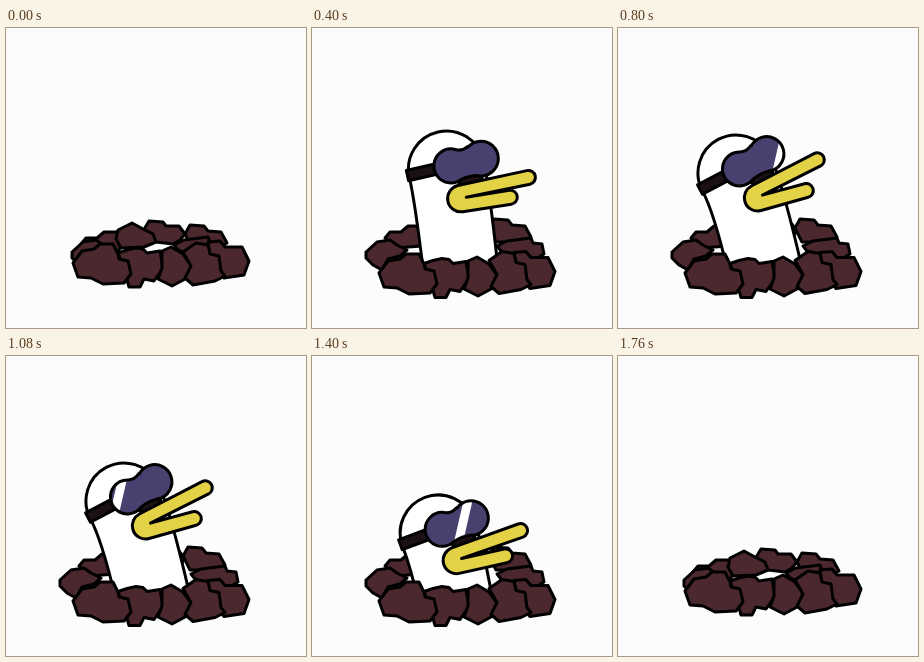
An HTML page with a canvas for the animation above (1.8 s loop, 300 by 300 pixels).

```html
<!DOCTYPE html>
<html lang="en">
<head>
<meta charset="utf-8">
<title>Bird in a burrow</title>
<style>
html, body { margin: 0; width: 100%; height: 100%; overflow: hidden; background: #fcfcfc; }
canvas { display: block; width: 300px; height: 300px; }
</style>
</head>
<body>
<canvas id="stage" width="300" height="300"></canvas>
<script>
const ctx = document.getElementById('stage').getContext('2d');
const LOOP = 1800, STEP = 40;
const ROCK = '#4b272e', LENS = '#4a4070', BEAK = '#e3d245', DARK = '#1b1014';

// Each rock: how far it is pushed outwards, then its outline when settled.
const backRocks = [
  { push: [0, -3], pts: [137,203, 143,193, 157,194, 160,198, 173,198, 179,206, 174,212, 167,216, 150,214] },
  { push: [-2, -6], pts: [179,206, 184,197, 198,198, 202,203, 215,204, 221,215, 212,220, 186,220] },
  { push: [17, 1], pts: [168,217, 178,212, 202,209, 204,214, 213,215, 215,225, 200,234, 172,222] },
  { push: [-2, -6], pts: [75,216, 80,210, 91,210, 98,204, 112,204, 117,214, 112,224, 85,226] },
  { push: [-2, -6], pts: [112,202, 126,195, 137,201, 147,206, 150,214, 138,219, 115,220, 110,211] },
  { push: [-12, 0], pts: [66,224, 77,214, 90,212, 97,217, 107,222, 100,228, 88,231, 82,242, 73,237, 66,230] }
];
const frontRocks = [
  { push: [0, 10.5], pts: [202,214, 214,213, 219,219, 236,219, 243,233, 238,247, 218,250, 205,235] },
  { push: [0, 10.5], pts: [112,225, 121,222, 130,220, 137,221, 141,225, 154,223, 157,240, 148,253, 138,251, 134,259, 123,259, 119,245] },
  { push: [0, 10], pts: [156,223, 165,219, 177,226, 185,237, 181,250, 166,258, 152,251, 156,240] },
  { push: [0, 8.5], pts: [177,224, 190,215, 202,217, 204,226, 213,228, 215,243, 219,248, 209,253, 187,257, 179,250, 185,238] },
  { push: [0, 10], pts: [76,223, 88,221, 94,216, 107,216, 112,226, 113,231, 122,233, 125,246, 118,255, 97,256, 85,250, 72,249, 67,235] }
];

const clamp = v => Math.max(0, Math.min(1, v));
const span = (t, a, b) => clamp((t - a) / (b - a));
const easeOut = v => 1 - (1 - v) * (1 - v);
const rad = d => d * Math.PI / 180;

function paint(fill) {
  ctx.fillStyle = fill;
  ctx.fill();
  ctx.stroke();
}

function drawRock({ push, pts }, spread) {
  ctx.beginPath();
  for (let i = 0; i < pts.length; i += 2) {
    ctx.lineTo(pts[i] + push[0] * spread, pts[i + 1] + push[1] * spread);
  }
  ctx.closePath();
  paint(ROCK);
}

function poseAt(t) {
  const rise = easeOut(span(t, 40, 360));
  const tilt = easeOut(span(t, 400, 760));
  const fall = span(t, 1120, 1660);
  const sink = fall * fall;
  const lean = (0.46 * span(t, 0, 400) + 0.54 * tilt) * (1 - sink);
  return {
    x: 148.5 - 30.5 * lean,
    y: 262 - 121 * rise + 4 * tilt + 119 * sink,
    angle: rad(-28 * lean),
    open: rad(9 * tilt * (1 - fall)),
    base: 148.5 - 2 * tilt - 15 * sink
  };
}

function drawBody({ x, y, angle, base }) {
  const c = Math.cos(angle), s = Math.sin(angle);
  const at = (u, v) => [x + u * c - v * s, y + u * s + v * c];
  const floor = Math.max(240, y + 40);
  ctx.beginPath();
  ctx.moveTo(base - 37.5, floor);
  ctx.quadraticCurveTo(...at(-38, 24), ...at(-38, 0));
  ctx.arc(x, y, 38, angle + Math.PI, angle + 2 * Math.PI);
  ctx.quadraticCurveTo(...at(38, 24), base + 37.5, floor);
  paint('#fff');
}

function drawBeak(open) {
  const hx = 7.5, hy = 32, r = 13.3, tip = 7;
  const mx = 13, my = 32;
  const low = rad(12.5) + open;
  const lx = mx + 45 * Math.cos(low) - 1, ly = my + 45 * Math.sin(low);
  const dir = Math.atan2(ly - hy, lx - hx) - 0.12;
  ctx.beginPath();
  ctx.arc(hx, hy, r, dir + Math.PI / 2, 1.5 * Math.PI);
  ctx.arc(78, 26.5, tip, -Math.PI / 2, Math.PI / 2);
  ctx.lineTo(mx, my);
  ctx.arc(lx, ly, tip, dir - Math.PI / 2, dir + Math.PI / 2);
  ctx.closePath();
  paint(BEAK);
}

function gogglesPath() {
  ctx.beginPath();
  ctx.arc(5, -2, 17, rad(65), rad(-62));
  ctx.quadraticCurveTo(19, -13.5, 26, -17.3);
  ctx.arc(36, -2.5, 17.3, rad(-124), rad(112));
  ctx.quadraticCurveTo(21, 11.5, 12.2, 13.4);
  ctx.closePath();
}

function drawGoggles(t, angle) {
  gogglesPath();
  ctx.fillStyle = LENS;
  ctx.fill();
  if (t > 717 && t < 1680) {
    // The gleam keeps its slant on the stage while the head turns.
    const shift = 40 - 0.168 * ((t - 717) % 481);
    ctx.save();
    ctx.clip();
    ctx.translate(20.5, -2.2);
    ctx.rotate(-angle);
    ctx.transform(1, 0, -0.23, 1, shift, 0);
    ctx.fillStyle = '#fff';
    ctx.fillRect(-4.5, -40, 9, 80);
    ctx.restore();
  }
  gogglesPath();
  ctx.stroke();
}

function drawBird(t, spread) {
  const pose = poseAt(t);
  ctx.save();
  ctx.beginPath();
  ctx.rect(0, 0, 300, 232 + 8 * spread);
  ctx.clip();
  drawBody(pose);
  ctx.translate(pose.x, pose.y);
  ctx.rotate(pose.angle);
  ctx.beginPath();
  ctx.rect(-39.5, -7.5, 29, 10.5);
  paint(DARK);
  ctx.beginPath();
  ctx.ellipse(21, 16, 12, 4, 0, 0, 2 * Math.PI);
  paint(DARK);
  drawBeak(pose.open);
  drawGoggles(t, pose.angle);
  ctx.restore();
}

function draw(t) {
  const spread = Math.min(span(t, 0, 320), 1 - span(t, 1440, 1760));
  ctx.fillStyle = '#fcfcfc';
  ctx.fillRect(0, 0, 300, 300);
  ctx.strokeStyle = '#000';
  ctx.lineWidth = 3;
  ctx.lineJoin = 'round';
  backRocks.forEach(r => drawRock(r, spread));
  if (t > 40 && t < 1660) drawBird(t, spread);
  frontRocks.forEach(r => drawRock(r, spread));
}

const start = performance.now();
function tick() {
  const t = (performance.now() - start) % LOOP;
  draw(Math.floor(t / STEP) * STEP);
  requestAnimationFrame(tick);
}
tick();
</script>
</body>
</html>
```
